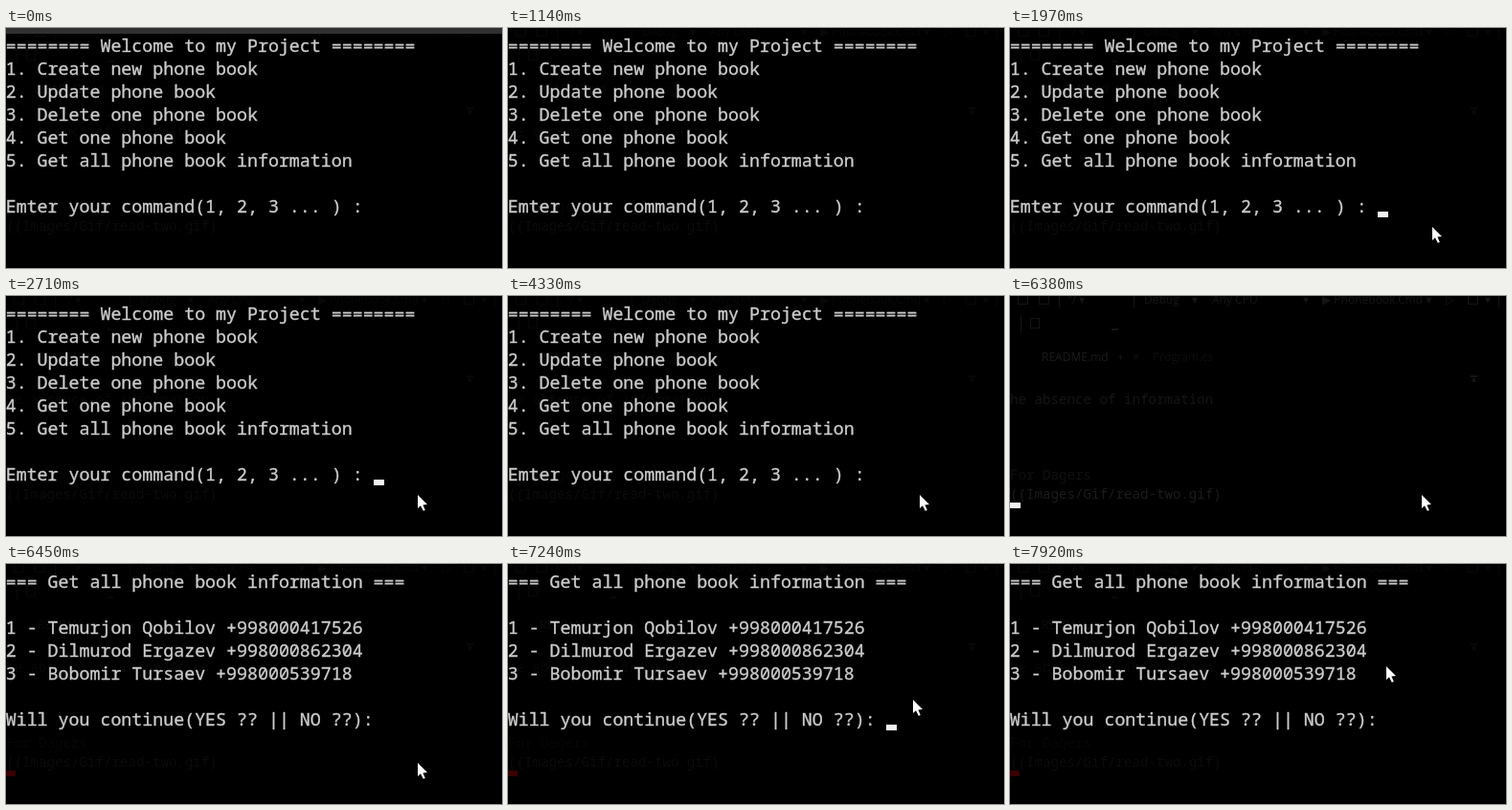
These frames come from a looping animation (518x251 px, 7.99 s). An HTML page with a canvas:

```html
<!DOCTYPE html>
<html lang="en">
<head>
<meta charset="utf-8">
<title>Phone book console</title>
<style>
html, body { margin: 0; width: 100%; height: 100%; overflow: hidden; background: #000; }
canvas { display: block; }
</style>
</head>
<body>
<canvas id="stage" width="518" height="251"></canvas>
<script>
const ctx = document.getElementById('stage').getContext('2d');
const LOOP = 7990;
const STEP = 67;    // pointer refresh, ms
const BLINK = 537;  // half a caret cycle, ms
const CELL = 10.98;
const ROW = 24;
const MONO = '"Noto Sans Mono", monospace';
const SANS = '"Open Sans", sans-serif';
const DIM = '#151515';

const MENU = `======== Welcome to my Project ========
1. Create new phone book
2. Update phone book
3. Delete one phone book
4. Get one phone book
5. Get all phone book information

Emter your command(1, 2, 3 ... ) : `;

const RESULT = `=== Get all phone book information ===

1 - Temurjon Qobilov +998000417526
2 - Dilmurod Ergazev +998000862304
3 - Bobomir Tursaev +998000539718

Will you continue(YES ?? || NO ??): `;

// What the console shows from each time on; the caret blinks from `blink`
const SCREENS = [
  { from: 0, text: MENU, blink: 1630, ghost: 0.4 },
  { from: 5460, text: MENU + '5', blink: 5383, ghost: 0.4 },
  { from: 6380, text: '\n'.repeat(8), blink: 6380, ghost: 1 },
  { from: 6450, text: RESULT, blink: 6983, ghost: 0.4, stain: true }
];

// Pointer path: step number and tip, joined by straight moves
const PATH = [
  [24, 445, 222], [29, 441, 208], [37, 441, 208], [40, 430, 208], [104, 430, 208],
  [108, 423, 142], [112, 407, 94], [114, 407, 94], [118, 393, 107]
];
const ARROW = [[0, 0], [0, 14], [3, 11.2], [5.8, 16.8], [7.8, 16], [5.4, 10.4], [10, 10]];

function rect(x, y, w, h, color) {
  ctx.fillStyle = color;
  ctx.fillRect(x, y, w, h);
}

function label(str, x, y, font, color = DIM) {
  ctx.font = font;
  ctx.fillStyle = color;
  ctx.fillText(str, x, y);
}

// Editor window showing faintly through the console
function backdrop(alpha) {
  const ui = '12px ' + SANS;
  const code = '14.17px ' + MONO;
  ctx.globalAlpha = alpha;

  ctx.strokeStyle = DIM;
  ctx.lineWidth = 1;
  for (const x of [8.5, 30.5, 478.5]) ctx.strokeRect(x, -1.5, 10, 10);
  ctx.strokeRect(21.5, 23.5, 9, 10);
  for (const x of [51, 129, 510]) rect(x, 0, 1, 12, DIM);
  rect(11, 20, 1, 18, DIM);
  rect(106, 34, 7, 2, DIM);
  rect(481, 83, 7, 2, DIM);
  rect(483, 86, 3, 4, DIM);

  label('"/ ▾', 60, 8, ui);
  label('Debug', 140, 8, ui);
  label('Any CPU', 211, 8, ui);
  label('▶ Phonebook.Cmd ▾', 326, 8, ui);
  label('▷', 455, 8, ui);
  for (const x of [190, 306, 496]) label('▾', x, 8, ui);

  label('README.md', 33, 68, ui, '#1b1b1b');
  label('+   ×', 112, 68, ui);
  label('Program.cs', 149, 68, ui, '#0e0e0e');
  label('he absence of information', 0, 113, code);
  label('For Dagers', 0, 192, code, '#101010');
  label('((Images/Gif/read-two.gif)', 0, 212, code, '#1b1b1b');
  ctx.globalAlpha = 1;
}

function printLines(lines) {
  ctx.strokeStyle = '#ccc';
  ctx.lineWidth = 0.35;
  lines.forEach((line, i) => {
    const y = 25 + i * ROW;
    label(line, -0.3, y, '18.3px ' + MONO, '#ccc');
    ctx.strokeText(line, -0.3, y);
  });
}

function caret(lines, age) {
  if (age < 0 || Math.floor(age / BLINK) % 2) return;
  const col = lines.at(-1).length;
  rect(Math.round(col * CELL), lines.length * ROW, 11, 6, '#f2f2f2');
}

function pointerAt(step) {
  const i = PATH.findLastIndex(p => p[0] <= step);
  const [s0, x0, y0] = PATH[i];
  const [s1, x1, y1] = PATH[i + 1] || [s0 + 1, x0, y0];
  const k = (step - s0) / (s1 - s0);
  return [Math.round(x0 + (x1 - x0) * k), Math.round(y0 + (y1 - y0) * k)];
}

function pointer(t) {
  if (t < 1630 || (t >= 1770 && t < 1970)) return;
  const [x, y] = pointerAt(Math.floor(t / STEP));
  ctx.beginPath();
  for (const [dx, dy] of ARROW) ctx.lineTo(x + dx, y + dy);
  ctx.fillStyle = '#fff';
  ctx.fill();
}

function draw(t) {
  const screen = SCREENS.findLast(s => s.from <= t);
  const lines = screen.text.split('\n');
  rect(0, 0, 518, 251, '#000');
  backdrop(screen.ghost);
  if (t < 1140) rect(0, 0, 518, 6, '#303030');
  if (screen.stain) rect(0, 216, 10, 6, '#380000');
  printLines(lines);
  caret(lines, t - screen.blink);
  pointer(t);
}

const start = performance.now();
function tick() {
  draw((performance.now() - start) % LOOP);
  requestAnimationFrame(tick);
}
tick();
</script>
</body>
</html>
```
